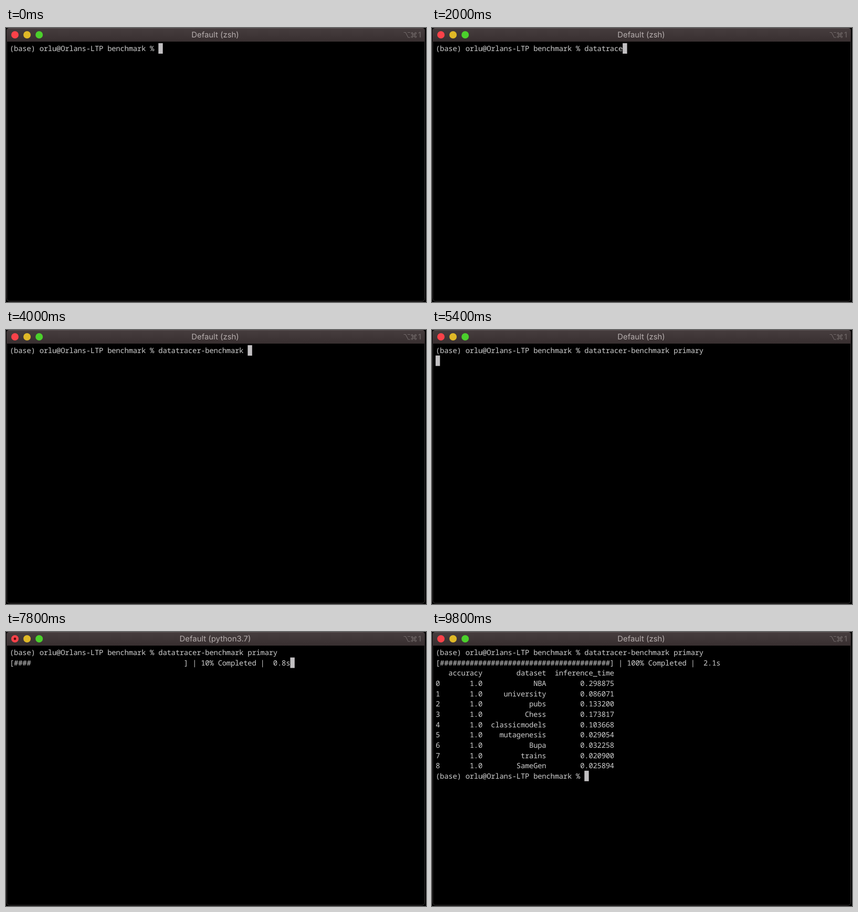
An HTML page that plays this animation: 800x523 px, repeating every 10 s.

```html
<!DOCTYPE html>
<html lang="en">
<head>
<meta charset="utf-8">
<title>Terminal benchmark</title>
<style>
  html, body { margin: 0; width: 100%; height: 100%; overflow: hidden; background: #000; }
  svg { display: block; width: 100vw; height: 100vh; }
  text { text-rendering: geometricPrecision; white-space: pre; }
  #lines text {
    font: 13.9px "Noto Sans Mono", "DejaVu Sans Mono", monospace;
    letter-spacing: -0.24px;
    fill: #cecece;
  }
  #title { font: 14.9px Inter, Roboto, sans-serif; fill: #b6aeae; text-anchor: middle; }
  #keys { fill: none; stroke: #716969; stroke-width: 1.1; }
  #keys text { font: 14.5px Inter, Roboto, sans-serif; fill: #716969; stroke: none; text-anchor: middle; }
</style>
</head>
<body>
<svg viewBox="0 0 800 523">
  <defs>
    <linearGradient id="bar" x2="0" y2="1">
      <stop offset="0" stop-color="#463d3e"/>
      <stop offset="1" stop-color="#382f30"/>
    </linearGradient>
  </defs>
  <rect width="800" height="523" fill="#000"/>
  <rect x="1.5" y="0.5" width="796" height="521" rx="5" fill="#000" stroke="#3b3838"/>
  <path d="M1 26V5Q1 0 6 0H793Q798 0 798 5V26Z" fill="url(#bar)"/>
  <path d="M5 .5H794" stroke="#5a5152"/>
  <circle cx="17" cy="13" r="7" fill="#fa4249"/>
  <circle id="busy" cx="17" cy="13" r="2.4" fill="#5e0a0e"/>
  <circle cx="40.1" cy="13" r="7" fill="#dfb827"/>
  <circle cx="63.2" cy="13" r="7" fill="#4bd02c"/>
  <text id="title" x="398.5" y="18.3"></text>
  <g id="keys">
    <path d="M757.5 8.5h3.6l5 9.5h3.9M765 8.5h5"/>
    <path transform="translate(776.8 13.4)" d="M-1.8 1.8V-3.3a1.5 1.5 0 1 0-1.5 1.5H3.3a1.5 1.5 0 1 0-1.5-1.5V3.3a1.5 1.5 0 1 0 1.5-1.5H-3.3a1.5 1.5 0 1 0 1.5 1.5z"/>
    <text x="788" y="18.3">1</text>
  </g>
  <rect id="cursor" width="8.4" height="20" fill="#c2c0c2"/>
  <g id="lines"></g>
</svg>
<script>
const LOOP = 10000, STEP = 200;
const LEFT = 7, COL = 8.1, ROW = 19.65, ROWS = 13;
const PROMPT = '(base) orlu@Orlans-LTP benchmark % ';
const COMMAND = 'datatracer-benchmark primary';
const START = 7000, DONE = 9200;

// Key points [time, value], joined by straight lines.
const TYPED = [[200, 0], [2400, 11], [3000, 16], [3200, 16], [4000, 21], [4200, 21], [5000, 28]];
const PERCENT = [[7600, 0], [7800, 10], [9000, 80], [DONE, 100]];

const RESULTS = `NBA 0.298875
university 0.086071
pubs 0.133200
Chess 0.173817
classicmodels 0.103668
mutagenesis 0.029054
Bupa 0.032258
trains 0.020900
SameGen 0.025894`;

const row = (id, accuracy, dataset, time) =>
  `${id}`.padEnd(1) + accuracy.padStart(10) + dataset.padStart(15) + time.padStart(16);
const TABLE = [
  row('', 'accuracy', 'dataset', 'inference_time'),
  ...RESULTS.split('\n').map((line, i) => row(i, '1.0', ...line.split(' ')))
];

function valueAt(points, t) {
  const next = points.findIndex(([time]) => time > t);
  if (next < 0) return points[points.length - 1][1];
  if (next === 0) return points[0][1];
  const [t0, v0] = points[next - 1], [t1, v1] = points[next];
  return v0 + (v1 - v0) * (t - t0) / (t1 - t0);
}

function progressLine(t) {
  const percent = Math.floor(valueAt(PERCENT, t) / 10) * 10;
  const bar = '#'.repeat(percent * 0.4).padEnd(40);
  const seconds = Math.min((t - START) / 1000, 2.1).toFixed(1);
  return `[${bar}] | ${percent}% Completed |  ${seconds}s`;
}

// The cursor always sits at the end of the last line.
function screenAt(t) {
  const lines = [PROMPT + COMMAND.slice(0, Math.round(valueAt(TYPED, t)))];
  if (t >= 5400) lines.push(t < START ? '' : progressLine(t));
  if (t >= DONE) lines.push(...TABLE, t < DONE + STEP ? '' : PROMPT);
  return lines;
}

const byId = id => document.getElementById(id);
const title = byId('title'), busy = byId('busy'), cursor = byId('cursor');
const lineNodes = Array.from({ length: ROWS }, (_, i) => {
  const node = document.createElementNS('http://www.w3.org/2000/svg', 'text');
  node.setAttribute('x', LEFT);
  node.setAttribute('y', 44 + ROW * i);
  return byId('lines').appendChild(node);
});

function draw(t) {
  const lines = screenAt(t);
  const last = lines.length - 1;
  const running = t >= 6200 && t < 9800;
  lineNodes.forEach((node, i) => { node.textContent = lines[i] || ''; });
  cursor.setAttribute('x', LEFT - 0.2 + COL * lines[last].length);
  cursor.setAttribute('y', 29 + ROW * last);
  title.textContent = `Default (${running ? 'python3.7' : 'zsh'})`;
  busy.style.display = running ? '' : 'none';
}

const origin = performance.now();
let shown = -1;
function tick() {
  const elapsed = (performance.now() - origin) % LOOP;
  const t = Math.floor(elapsed / STEP) * STEP;
  if (t !== shown) draw(shown = t);
  requestAnimationFrame(tick);
}
tick();
</script>
</body>
</html>
```
